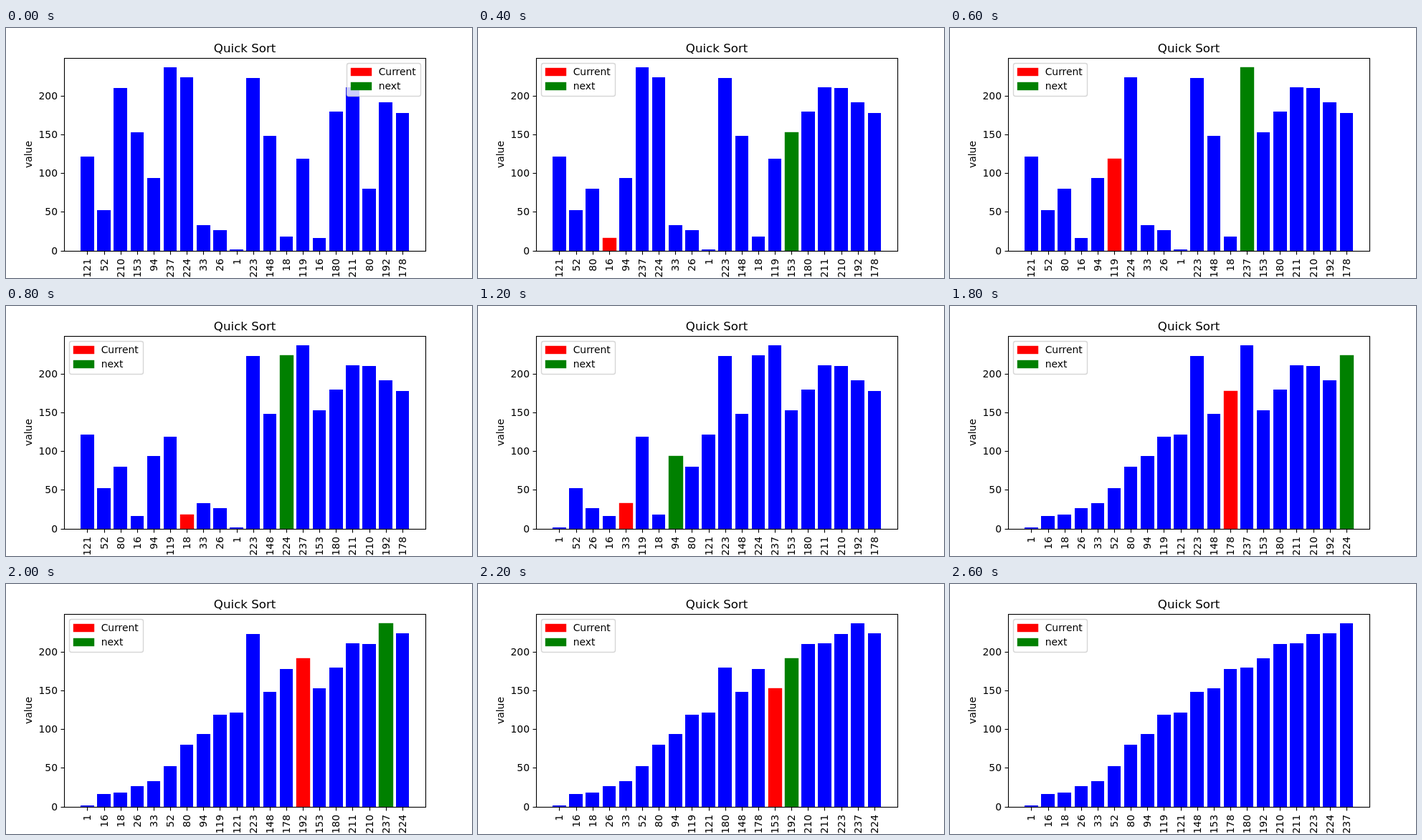
Recreate the animation shown at these times as an HTML page with a canvas. Size 650 by 350 pixels, loop 3.4 s.

```html
<!DOCTYPE html>
<html lang="en">
<head>
<meta charset="utf-8">
<title>Quick Sort</title>
<style>
  html, body { margin: 0; width: 100%; height: 100%; overflow: hidden; background: #fff; }
  canvas { display: block; }
</style>
</head>
<body>
<canvas id="chart" width="650" height="350"></canvas>
<script>
const ctx = document.getElementById('chart').getContext('2d');
const STEP = 200, LOOP = 3400;
const PT = 100 / 72, FONT = 10 * PT;
const LEFT = 81.25, RIGHT = 585, TOP = 42, BOTTOM = 311.5;
const values = [121, 52, 210, 153, 94, 237, 224, 33, 26, 1,
                223, 148, 18, 119, 16, 180, 211, 80, 192, 178];
const UNIT = (RIGHT - LEFT) / (1.1 * (values.length - 0.2));
const SCALE = (BOTTOM - TOP) / (1.05 * Math.max(...values));
const barX = i => LEFT + (0.05 * (values.length - 0.2) + i) * UNIT;
const valueY = v => BOTTOM - v * SCALE;

// Every exchange inside a partition is a step; pivot placement is not shown.
function sortSteps(list) {
  const a = [...list], steps = [];
  const record = (current = -1, next = -1) => steps.push({ bars: [...a], current, next });
  const swap = (i, j) => { [a[i], a[j]] = [a[j], a[i]]; };
  function sort(lo, hi) {
    if (lo >= hi) return;
    const pivot = a[lo];
    let i = lo + 1, j = hi;
    while (true) {
      while (i <= j && a[i] <= pivot) i++;
      while (i <= j && a[j] >= pivot) j--;
      if (i > j) break;
      swap(i, j);
      record(i, j);
    }
    swap(lo, j);
    sort(lo, j - 1);
    sort(j + 1, hi);
  }
  record();
  sort(0, a.length - 1);
  record(0, 1);
  record();
  return steps;
}
const steps = sortSteps(values);

function rect(x0, y0, x1, y1, color, edge) {
  [x0, y0, x1, y1] = [x0, y0, x1, y1].map(Math.round);
  ctx.fillStyle = ctx.strokeStyle = color;
  ctx.fillRect(x0, y0, x1 - x0, y1 - y0);
  if (!edge) return;
  ctx.lineWidth = PT;
  ctx.strokeRect(x0 + 0.5, y0 + 0.5, x1 - x0, y1 - y0);
}

function line(x0, y0, x1, y1) {
  ctx.beginPath();
  ctx.moveTo(x0, y0);
  ctx.lineTo(x1, y1);
  ctx.stroke();
}

function text(str, x, y, align, { size = FONT, turned = false } = {}) {
  ctx.save();
  ctx.translate(x, y);
  if (turned) ctx.rotate(-Math.PI / 2);
  ctx.font = `${size}px "DejaVu Sans", sans-serif`;
  ctx.textAlign = align;
  ctx.fillStyle = '#000';
  ctx.fillText(str, 0, 0);
  ctx.restore();
}

function drawBars({ bars, current, next }) {
  ctx.save();
  ctx.beginPath();
  ctx.rect(81, 42, 504, 270);
  ctx.clip();
  bars.forEach((v, i) => {
    const color = i === current ? '#f00' : i === next ? '#008000' : '#00f';
    rect(barX(i), valueY(v), barX(i) + 0.8 * UNIT, BOTTOM, color, color !== '#00f');
  });
  ctx.restore();
}

function drawAxes(bars) {
  ctx.strokeStyle = '#000';
  ctx.lineWidth = 0.8 * PT;
  ctx.strokeRect(81.5, 42.5, 504, 270);
  bars.forEach((v, i) => {
    const x = Math.round(barX(i) + 0.4 * UNIT);
    line(x + 0.5, 312.5, x + 0.5, 317.5);
    text(v, x + 5, 323, 'right', { turned: true });
  });
  for (let v = 0; v <= 200; v += 50) {
    const y = Math.round(valueY(v));
    line(76.5, y + 0.5, 81.5, y + 0.5);
    text(v, 72, y + 5, 'right');
  }
  text('value', 36, 177, 'center', { turned: true });
  text('Quick Sort', 333.1, 34, 'center', { size: 12 * PT });
}

function drawLegend(x) {
  const x0 = Math.round(x) + 0.5;
  ctx.beginPath();
  ctx.roundRect(x0, 49.5, 103, 46, 0.2 * FONT);
  ctx.fillStyle = 'rgba(255,255,255,0.8)';
  ctx.strokeStyle = 'rgba(204,204,204,0.8)';
  ctx.lineWidth = PT;
  ctx.fill();
  ctx.stroke();
  [['Current', '#f00', 66], ['next', '#008000', 86]].forEach(([label, color, y]) => {
    const left = x + 0.4 * FONT;
    rect(left, y - 10, left + 2 * FONT, y, color, true);
    text(label, left + 2.8 * FONT, y, 'left');
  });
}

function frame(now) {
  const n = Math.min(Math.floor((now % LOOP) / STEP), steps.length - 1);
  ctx.fillStyle = '#fff';
  ctx.fillRect(0, 0, 650, 350);
  drawBars(steps[n]);
  drawAxes(steps[n].bars);
  drawLegend(n === 0 ? 475.2 : 88.2);
  requestAnimationFrame(frame);
}
requestAnimationFrame(frame);
</script>
</body>
</html>
```
